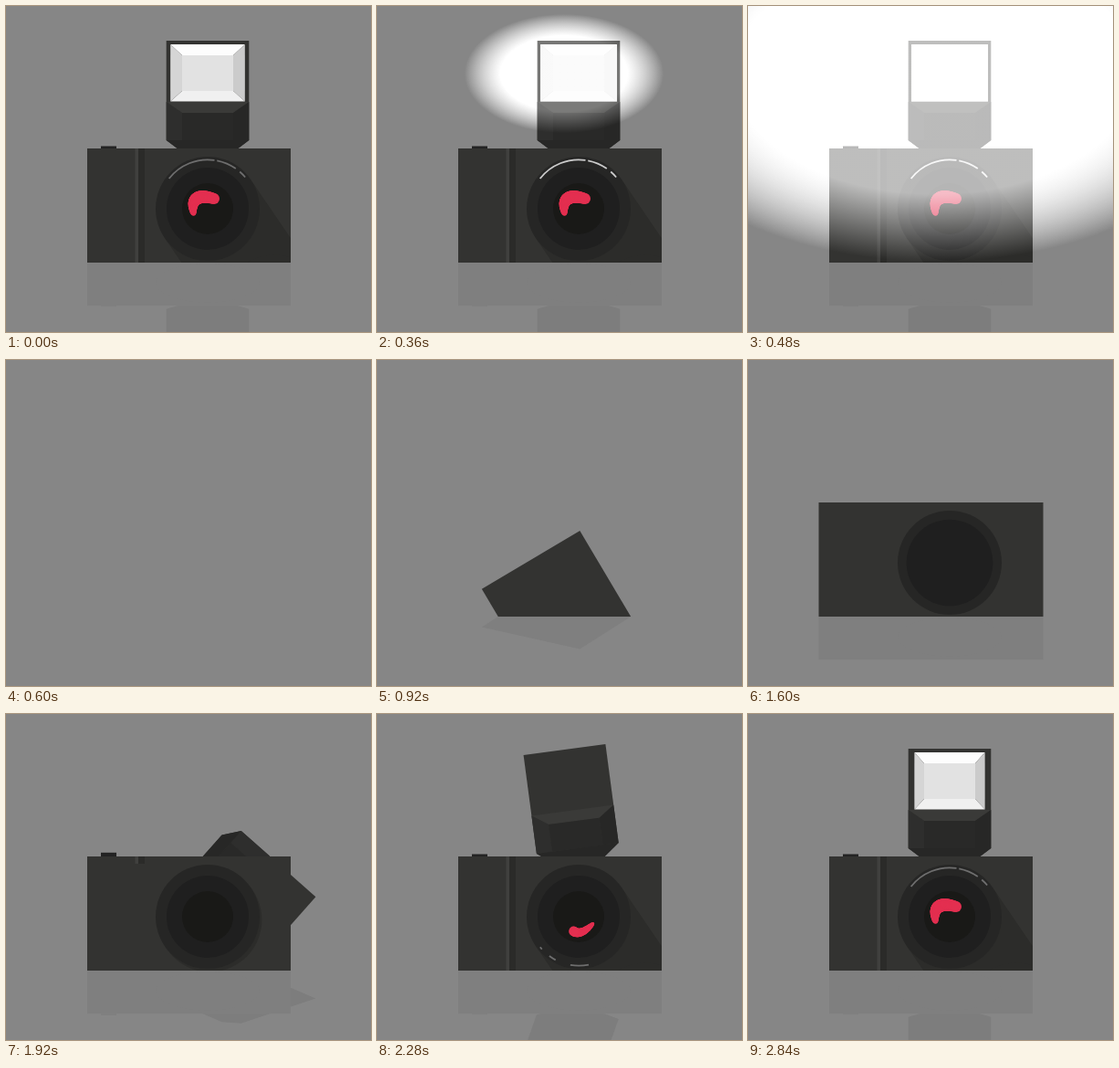
Write an HTML page with a canvas that moves like this. It is 400 px wide and 357 px high and loops after 2880 ms.

```html
<!DOCTYPE html>
<html lang="en">
<head>
<meta charset="utf-8">
<title>Camera flash</title>
<style>
html, body { margin: 0; width: 100%; height: 100%; overflow: hidden; background: #868686; }
canvas { display: block; width: 400px; height: 357px; }
</style>
</head>
<body>
<canvas id="stage" width="400" height="357"></canvas>
<script>
const ctx = document.getElementById('stage').getContext('2d');
const W = 400, H = 357, FLOOR = 281, LOOP = 2880, STEP = 40;
const BLANK = 600, BUILD = 840;
const DEG = Math.PI / 180;
const LENS = { x: 221, y: 222, r: 57 };
const BODY = { x: 200.5, y: 218.5, half: 62.5 };
const C = {
  bg: '#868686', mirror: '#7f7f7f', body: '#333331', shadow: '#2c2c2a', button: '#232323',
  lens: '#262625', ring: '#1f1f1f', core: '#191917', pink: '#e32f50'
};

const clamp = v => Math.max(0, Math.min(1, v));
const span = (t, a, b) => clamp((t - a) / (b - a));
const mix = (a, b, k) => a + (b - a) * k;
const easeOut = (p, n = 2) => 1 - (1 - p) ** n;
const backOut = (p, s = 1.70158) => 1 + (s + 1) * (p - 1) ** 3 + s * (p - 1) ** 2;
const pop = (t, a, b, s) => t <= a ? 0 : backOut(span(t, a, b), s);

function poly(points, fill) {
  ctx.beginPath();
  points.forEach(p => ctx.lineTo(p[0], p[1]));
  ctx.closePath();
  ctx.fillStyle = fill;
  ctx.fill();
}

function rect(x0, y0, x1, y1, fill) {
  ctx.fillStyle = fill;
  ctx.fillRect(x0, y0, x1 - x0, y1 - y0);
}

function disc(x, y, r, fill) {
  ctx.beginPath();
  ctx.arc(x, y, r, 0, Math.PI * 2);
  ctx.fillStyle = fill;
  ctx.fill();
}

function group(draw) {
  ctx.save();
  draw();
  ctx.restore();
}

function clipBox(x, y, w, h) {
  ctx.beginPath();
  ctx.rect(x, y, w, h);
  ctx.clip();
}

const corners = (w, top, bottom) => [[-w, top], [w, top], [w, bottom], [-w, bottom]];

// Four bevels between an outer and an inner rectangle: top, right, bottom, left
function bevel(outer, inner, fills) {
  fills.forEach((fill, i) => {
    const j = (i + 1) % 4;
    poly([outer[i], outer[j], inner[j], inner[i]], fill);
  });
}

// Drawn around the foot of the flash head
function lamp(t, flash) {
  const s = easeOut(span(t, 2500, 2660));
  if (!s) return;
  const v = easeOut(span(t, 2640, 2800));
  const h = easeOut(span(t, 2690, 2910), 1.25);
  const mid = -82.5, iw = 28 * s, ih = 19.5 * s;
  const inner = corners(iw, mid - ih, mid + ih);
  const outer = corners(iw + 14 * h, mid - ih - 12 * v, mid + ih + 11.5 * v);
  bevel(outer, inner, ['#fdfdfd', '#cbcbcb', '#f0f0f0', '#d5d5d5']);
  poly(inner, '#e2e2e2');
  poly(outer, `rgba(255,255,255,${clamp(flash * 1.4) ** 2})`);
}

function head(t, flash, flat) {
  if (t <= 1890) return;
  group(() => {
    ctx.translate(LENS.x, 156);
    ctx.rotate(Math.PI * (1 - pop(t, 1890, 2370)));
    const w = 45.3;
    poly([[-w, -118], [w, -118], [w, -9], [28, 4], [-28, 4], [-w, -9]], flat || C.body);
    if (flat) return;
    poly([[-w, -51], [w, -51], [28, -39], [-28, -39]], '#3a3a38');
    poly([[-w, -51], [-28, -39], [-28, -9], [-w, -9]], '#2e2e2d');
    poly([[w, -51], [28, -39], [28, -9], [w, -9]], '#272726');
    rect(-28, -39, 28, -9, '#292928');
    poly([[-w, -9], [w, -9], [28, 4], [-28, 4]], '#272726');
    lamp(t, flash);
  });
}

function button(t, flat) {
  const rise = 4.2 * pop(t, 1800, 1900) - 1.7 * span(t, 1920, 2040);
  rect(104, 156 - rise, 121, 156, flat || C.button);
}

// A spinning square rises, then widens into the camera body
function body(t, flat) {
  group(() => {
    ctx.translate(BODY.x, BODY.y + 118 * (1 - pop(t, 831, 1465)));
    ctx.rotate(Math.PI / 2 * (1 - span(t, 840, 1360)) ** 2.5);
    const half = BODY.half + 49 * pop(t, 1370, 1800, 2.9);
    rect(-half, -BODY.half, half, BODY.half, flat || C.body);
  });
}

function stripes(t) {
  const drop = 125 * easeOut(span(t, 1910, 2220));
  rect(141.5, 156, 145, 156 + drop, '#40403e');
  rect(145, 156, 152, 156 + drop, '#2b2b29');
}

function lensShadow(t) {
  const len = 130 * span(t, 1905, 2200) ** 1.15;
  if (!len) return;
  group(() => {
    clipBox(89, 156, 223, 125);
    ctx.translate(LENS.x, LENS.y);
    ctx.rotate(55.7 * DEG);
    rect(0, -LENS.r, len, LENS.r, C.shadow);
    disc(len, 0, LENS.r, C.shadow);
  });
}

// Tapered bean: discs strung along a quadratic curve
function bean(k) {
  const ax = mix(-16, -15.5, k), ay = mix(-7, 5, k);
  const bx = mix(-2.5, -20, k), by = mix(-21.5, -19, k);
  const cx = mix(5, 7, k), cy = mix(-16, -11, k);
  const n = 40;
  for (let i = 0; i <= n; i++) {
    const u = i / n, q = 1 - u;
    const r = mix(mix(1.5, 2.7, k), mix(5.3, 6, k), Math.sqrt(u)) + 1.8 * k * Math.sin(Math.PI * u);
    disc(q * q * ax + 2 * q * u * bx + u * u * cx,
         q * q * ay + 2 * q * u * by + u * u * cy, r, C.pink);
  }
}

function highlights(t, flash) {
  if (t <= 2160) return;
  const grow = easeOut(span(t, 2160, 2600), 1.4);
  const glare = (from, to) => {
    ctx.beginPath();
    ctx.arc(0, 0, 53.7, mix(to, from, grow) * DEG, to * DEG);
    ctx.stroke();
  };
  group(() => {
    ctx.translate(LENS.x, LENS.y);
    ctx.rotate(-350 * DEG * (1 - span(t, 2160, 2800)) ** 3.25);
    ctx.strokeStyle = `hsl(0 0% ${mix(43, 100, flash)}%)`;
    ctx.lineWidth = 1.8;
    glare(218, 278);
    glare(281, 305);
    glare(311, 320);
    const size = span(t, 2160, 2270);
    ctx.scale(size, size);
    bean(span(t, 2280, 2660));
  });
}

function lens(t, flash, flat) {
  if (t <= 1160) return;
  const y = LENS.y + 118 * (1 - pop(t, 1160, 1580));
  disc(LENS.x, y, LENS.r, flat || C.lens);
  if (flat) return;
  disc(LENS.x, y, 45 * pop(t, 1480, 1760), C.ring);
  disc(LENS.x, y, 28 * pop(t, 1600, 1880), C.core);
  highlights(t, flash);
}

function scene(t, flash, flat) {
  if (t < BUILD) return;
  head(t, flash, flat && '#7d7d7d');
  button(t, flat);
  body(t, flat);
  if (!flat) {
    stripes(t);
    lensShadow(t);
  }
  lens(t, flash, flat);
}

function glow(size, alpha) {
  if (size < 0.002) return;
  group(() => {
    ctx.globalAlpha = alpha;
    ctx.translate(205, 74);
    ctx.scale(345 * size, 206 * size);
    const g = ctx.createRadialGradient(0, 0, 0.64, 0, 0, 1);
    g.addColorStop(0, '#fff');
    g.addColorStop(1, 'rgba(255,255,255,0)');
    disc(0, 0, 1, g);
  });
}

function draw(now) {
  const firing = now < BLANK;
  const t = firing ? now + LOOP : now;
  const flash = firing ? now / 560 : 0;
  const size = firing ? (now / 480) ** 4 : 0;

  rect(0, 0, W, H, C.bg);
  group(() => {
    clipBox(0, FLOOR, W, H - FLOOR);
    ctx.translate(0, FLOOR);
    ctx.scale(1, -0.378);
    ctx.translate(0, -FLOOR);
    scene(t, 0, C.mirror);
  });
  glow(size, 1);
  group(() => {
    clipBox(0, 0, W, FLOOR);
    scene(t, clamp(flash), null);
  });
  glow(size, clamp(flash ** 2.5));
}

const start = performance.now();
function tick() {
  const t = (performance.now() - start) % LOOP;
  draw(Math.floor(t / STEP) * STEP);
  requestAnimationFrame(tick);
}
tick();
</script>
</body>
</html>
```
